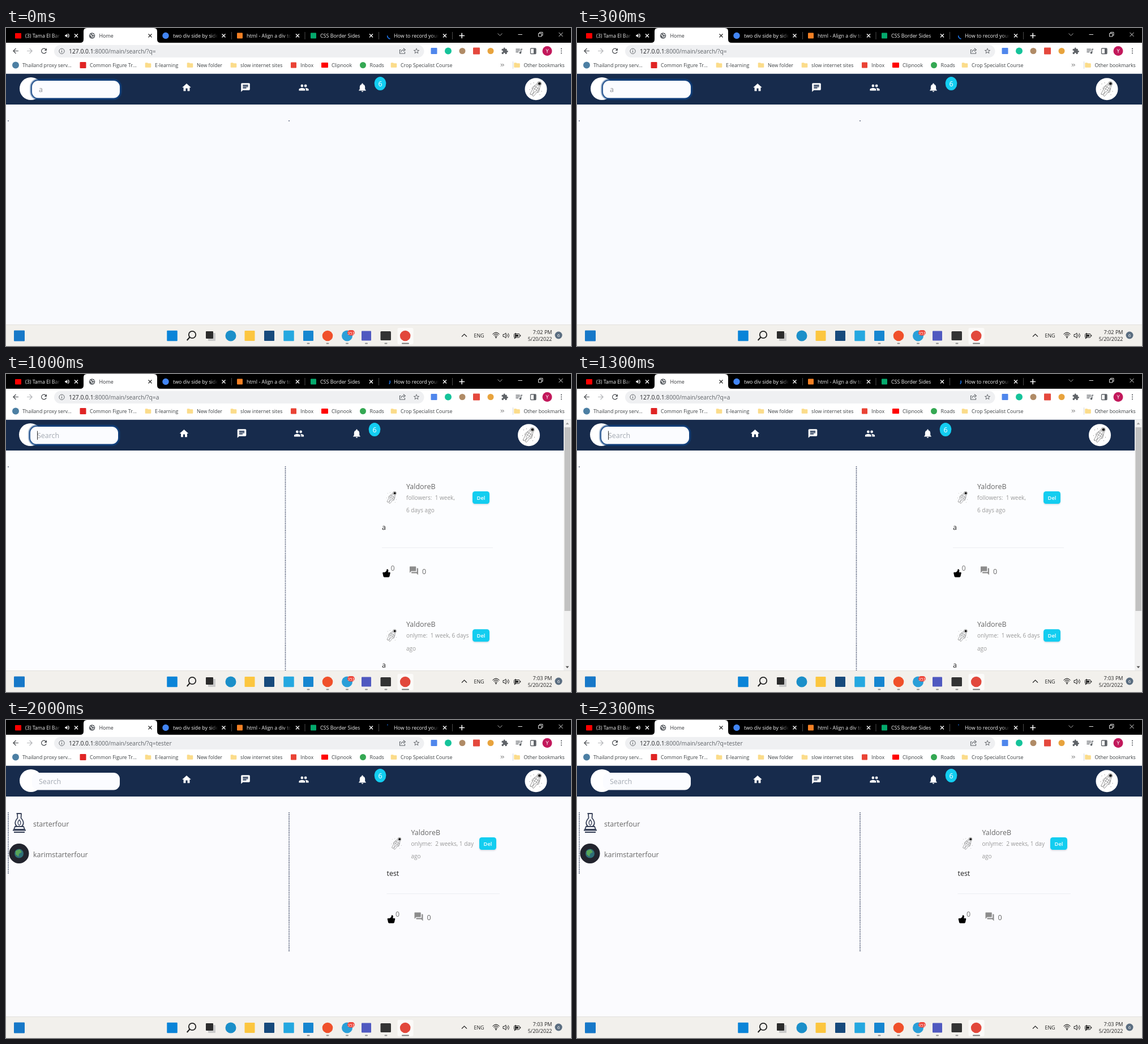
Animation of 998x561 px, one loop 2500 ms. Source, as an HTML page:

```html
<!DOCTYPE html>
<html lang="en">
<head>
<meta charset="utf-8">
<title>Search page</title>
<style>
html, body { margin: 0; width: 100%; height: 100%; overflow: hidden; background: #fff; }
svg { display: block; width: 998px; height: 561px; font-family: "Open Sans", "Noto Sans", sans-serif; }
text { white-space: pre; }
</style>
</head>
<body>
<svg id="stage" viewBox="0 0 998 561">
  <defs>
    <linearGradient id="fade"><stop offset="0" stop-opacity="0"/><stop offset="1"/></linearGradient>
    <clipPath id="view"><rect y="80" width="998" height="444"/></clipPath>
    <filter id="soft" x="-20%" y="-30%" width="140%" height="170%"><feGaussianBlur stdDeviation="1.2"/></filter>
  </defs>
  <g id="page" clip-path="url(#view)"></g>
  <g id="chrome"></g>
  <g id="live"></g>
</svg>
<script>
const LOOP = 2500, STEP = 500;
const NAVY = '#172b4c', CYAN = '#13cdf0';

const ICON = {
  home: 'M10 20v-6h4v6h5v-8h3L12 3 2 12h3v8z',
  chat: 'M20 2H4a2 2 0 0 0-2 2v18l4-4h14a2 2 0 0 0 2-2V4a2 2 0 0 0-2-2zM6 9h12v2H6zM6 12h8v2H6zM6 6h12v2H6z',
  people: 'M16 11a3 3 0 1 0 0-6 3 3 0 0 0 0 6zM8 11a3 3 0 1 0 0-6 3 3 0 0 0 0 6zm0 2c-2.3 0-7 1.2-7 3.5V19h14v-2.5c0-2.3-4.7-3.5-7-3.5zm8 0l-1 .1c1.2.8 2 2 2 3.4V19h6v-2.5c0-2.3-4.7-3.5-7-3.5z',
  bell: 'M12 22a2 2 0 0 0 2-2h-4a2 2 0 0 0 2 2zm6-6v-5c0-3-1.6-5.6-4.5-6.3V4a1.5 1.5 0 0 0-3 0v.7C7.6 5.4 6 8 6 11v5l-2 2v1h16v-1z',
  forum: 'M21 6h-2v9H6v2a1 1 0 0 0 1 1h11l4 4V7a1 1 0 0 0-1-1zm-4 6V3a1 1 0 0 0-1-1H3a1 1 0 0 0-1 1v14l4-4h10a1 1 0 0 0 1-1z',
  star: 'M22 9.2l-7.2-.6L12 2 9.2 8.6 2 9.2 7.5 14 5.8 21l6.2-3.7L18.2 21l-1.6-7zM12 15.4l-3.8 2.3 1-4.3-3.3-2.9 4.4-.4L12 6.1l1.7 4 4.4.4-3.3 2.9 1 4.3z',
  puzzle: 'M20.5 11H19V7a2 2 0 0 0-2-2h-4V3.5a2.5 2.5 0 0 0-5 0V5H4a2 2 0 0 0-2 2v3.8h1.5a2.7 2.7 0 0 1 0 5.4H2V20a2 2 0 0 0 2 2h3.8v-1.5a2.7 2.7 0 0 1 5.4 0V22H17a2 2 0 0 0 2-2v-4h1.5a2.5 2.5 0 0 0 0-5z',
  queue: 'M15 6H3v2h12zM15 10H3v2h12zM3 16h8v-2H3zM17 6v8.2a3 3 0 1 0 2 2.8V8h3V6z',
  reload: 'M17.6 6.4A8 8 0 1 0 19.7 14h-2.1A6 6 0 1 1 16.2 7.8L13 11h7V4z',
  back: 'M20 11H7.8l5.6-5.6L12 4l-8 8 8 8 1.4-1.4L7.8 13H20z',
  sound: 'M3 9v6h4l5 5V4L7 9zM16.5 12A4.5 4.5 0 0 0 14 8v8a4.5 4.5 0 0 0 2.5-4zM14 3.2v2.1a7 7 0 0 1 0 13.4v2.1a9 9 0 0 0 0-17.6z',
  folder: 'M10 4H4a2 2 0 0 0-2 2v12a2 2 0 0 0 2 2h16a2 2 0 0 0 2-2V8a2 2 0 0 0-2-2h-8z',
  thumb: 'M2 12q0-2 2-2h4q4.500-2 5-8 3.500-.5 4 3 0 3-1 5h4q2 0 2 2l-2 9q-.5 2-2.500 2h-11q-2 0-2.500-2z'
};

const $ = id => document.getElementById(id);
const text = (x, y, s, size, fill, more = '') =>
  `<text x="${x}" y="${y}" font-size="${size}" fill="${fill}" ${more}>${s}</text>`;
const rect = (x, y, w, h, fill, r = 0, more = '') =>
  `<rect x="${x}" y="${y}" width="${w}" height="${h}" rx="${r}" fill="${fill}" ${more}/>`;
const disc = (x, y, r, fill, more = '') =>
  `<circle cx="${x}" cy="${y}" r="${r}" fill="${fill}" ${more}/>`;
const square = (x, y, size, fill) => rect(x - size / 2, y - size / 2, size, size, fill, 1);
const line = (d, stroke, w = 1, more = '') =>
  `<path d="${d}" fill="none" stroke="${stroke}" stroke-width="${w}" ${more}/>`;
const icon = (name, x, y, k, fill, turn = 0) =>
  `<path d="${ICON[name]}" fill="${fill}" fill-rule="evenodd" transform="translate(${x} ${y}) rotate(${turn}) scale(${k}) translate(-12 -12)"/>`;
const cross = (x, y, r, c, w = 1.3) =>
  line(`M${x - r} ${y - r}l${2 * r} ${2 * r}m0 ${-2 * r}l${-2 * r} ${2 * r}`, c, w);
const dots = (x, y1, y2) =>
  line(`M${x} ${y1}V${y2}`, '#3b4663', 1.6, 'stroke-dasharray="1.56 1.56"');

function globe(x, y) {
  return disc(x, y, 5.3, '#5f6368') +
    line(`M${x - 4} ${y - 2}l3 2 1 3M${x} ${y - 4}l1 2 3 .5M${x + 1} ${y + 3}l2.5-2`, '#fff', 1.3);
}

function tabs() {
  const list = [
    [34, 97, '(3) Tama El Bar', 124], [295, 374, 'two div side by side', 384.5],
    [425, 504, 'html - Align a div to', 515], [555, 640, 'CSS Border Sides', 645],
    [685, 764, 'How to record your', 775]
  ];
  let s = rect(0, 0, 998, 26, '#000') +
    '<path d="M131 26q6 0 6-6V6q0-6 6-6h118q6 0 6 6v14q0 6 6 6z" fill="#fff"/>';
  for (const [x, end, name, shut] of list)
    s += text(x, 17, name, 8.9, '#f2f2f2') + rect(end - 14, 4, 14, 19, 'url(#fade)') +
      rect(end, 4, 6, 19, '#000') + cross(shut, 13.5, 3, '#fff');
  for (const x of [398, 527.5, 658, 788]) s += rect(x, 7, 1, 13, '#4a4a4a');
  s += rect(16, 9, 11, 9.5, '#f00', 1) + icon('sound', 108, 13.5, .42, '#fff') +
    globe(152, 13.5) + text(164.5, 17, 'Home', 8.9, '#303236') + cross(254.5, 13.5, 3, '#333') +
    disc(282, 13.5, 5.7, '#4285f4') + square(413, 13.5, 10, '#f48024') + square(543, 13.5, 10, '#04aa6d');
  s += line('M800.5 13.5h9.5M805.25 8.7v9.5', '#fff', 1.5) +
    line('M868.5 9.5l4 4 4-4', '#aaa') + line('M904.5 11.5h7.5', '#ddd') +
    line('M940.5 9.5h5.5v5.5h-5.5zM942.5 9.5v-2h5.5v5.5h-2', '#ddd') + cross(980, 11.5, 3.5, '#ddd', 1);
  return s;
}

function toolbar() {
  const grey = '#5f6368';
  return rect(0, 26, 998, 54.5, '#fff') + rect(85, 30, 653.5, 22, '#eff0f2', 11) +
    icon('back', 17, 40.5, .62, '#4a4d51') + icon('back', 42, 40.5, .62, '#b5b7ba', 180) +
    icon('reload', 67, 40.5, .62, '#4a4d51') +
    disc(98.5, 40.8, 4.6, 'none', `stroke="${grey}"`) + line('M98.5 40v3.3M98.5 37.9v1.2', grey, 1.1) +
    line('M697.5 38.5h-2v6.5h9v-3M697.8 42.5q.7-4 5-4M701.8 35.8l3.5 2.7-3.5 2.7', grey, 1.1) +
    icon('star', 725, 40.5, .54, grey) +
    square(756, 40.5, 11, '#4f86ec') + disc(781, 40.5, 6, '#15c39a') + disc(806, 40.5, 5.5, '#b08b66') +
    square(831, 40.5, 12, '#e5483d') + disc(856, 40.5, 5.5, '#e8a33d') +
    icon('puzzle', 881, 40.5, .54, grey) + icon('queue', 906, 40.5, .62, grey) +
    rect(926.5, 36, 9.5, 9.5, 'none', 1, `stroke="${grey}" stroke-width="1.3"`) + rect(932, 36, 4, 9.5, grey) +
    disc(956, 40.5, 8.5, '#c2185b') + text(956, 44, 'Y', 9, '#fff', 'text-anchor="middle"') +
    [36.7, 40.5, 44.3].map(y => disc(981, y, 1.1, grey)).join('');
}

function bookmarks() {
  const list = [
    [29, 'Thailand proxy serv...', disc(17, 65.5, 6, '#4c7fa3')],
    [148, 'Common Figure Tr...', square(136, 65.5, 11, '#e02424')],
    [263, 'E-learning'], [337, 'New folder'], [414, 'slow internet sites'],
    [520, 'Inbox', square(508, 65.5, 10, '#ea4335')],
    [575, 'Clipnook', rect(557, 61, 12, 9, '#f00', 1)],
    [642.5, 'Roads', disc(630.5, 65.5, 5.5, '#34a853')],
    [697, 'Crop Specialist Course'], [914.5, 'Other bookmarks']
  ];
  return list.map(([x, name, mark]) =>
    (mark || icon('folder', x - 12, 65.5, .53, '#fbdc8a')) + text(x, 69, name, 8.8, '#3c4043')).join('') +
    line('M874 63l2.3 2.3-2.3 2.3M877 63l2.3 2.3-2.3 2.3', '#555') + rect(895, 59, 1, 13, '#d5d7da');
}

function taskbar() {
  const ink = '#222';
  let s = rect(0, 523.5, 998, 38, '#f2f0ec') + rect(0, 523, 998, 1, '#e3e1dd') +
    rect(691.5, 529, 28, 29, '#fbfaf8', 3);
  s += square(23.5, 543, 19, '#1778c8') + square(293.5, 543, 18.5, '#0a84d8') +
    disc(329, 541, 6.2, 'none', 'stroke="#222" stroke-width="1.8"') + line('M324.5 545.5l-4.8 5.5', ink, 2) +
    rect(357, 538, 13, 14, '#c9c9c9', 1) + rect(353, 535, 13, 13, '#2b2b2b', 1) +
    disc(397, 543, 9.5, '#1b8fc9') + square(430.5, 543, 18, '#fcc63f') + square(465, 543, 18, '#174a7c') +
    square(499.5, 543, 18.5, '#25a8e0') + square(534, 543, 18, '#1686d0') + disc(568, 543, 9.3, '#f0502a') +
    disc(602.5, 543, 9.5, '#2a9fd8') + square(636.5, 543, 17, '#5059c0') +
    rect(661.5, 535, 18.5, 16, '#333', 1.5) + disc(705.2, 543, 9.3, '#e2483c');
  s += rect(603, 533, 13, 9.5, '#ee4136', 4.7) +
    text(609.5, 540.6, '353', 7, '#fff', 'text-anchor="middle"');
  for (const x of [534, 568, 602.5, 636.5, 671]) s += rect(x - 2.5, 555.5, 5, 2, '#8b8b8b', 1);
  s += rect(699, 555.5, 13, 2, '#777', 1);
  s += line('M805 544.5l4.5-4.5 4.5 4.5', ink, 1.1) + text(826.5, 546, 'ENG', 8.8, ink);
  s += [6, 4, 2].map(r => line(`M${865.5 - r} ${546.5 - r}Q865.5 ${544.5 - 1.8 * r} ${865.5 + r} ${546.5 - r}`, ink, 1.1)).join('') +
    disc(865.5, 546, 1.2, ink) +
    line('M878 540.5h2l3-2.5v9l-3-2.5h-2zM885 540.5q1.5 2 0 4M887 538.5q3 4 0 8', ink) +
    rect(897.5, 539.5, 9.5, 6.5, 'none', 1, `stroke="${ink}"`) + rect(899, 541, 6, 3.5, ink) +
    rect(908, 541.5, 1.2, 2.5, ink) + line('M900 538v8l-2 2', ink, 1.5) +
    disc(976, 542, 6.5, '#5a6d80') + text(976, 545, '6', 8, '#fff', 'text-anchor="middle"');
  return s;
}

// Floating figure sketch used as the profile picture
function sketch(x, y, k) {
  const specks = [[-9, -9], [-11, 1], [-4, -11], [10, 4], [7, 10], [-9, 9]];
  return `<g transform="translate(${x} ${y}) scale(${k})">` +
    specks.map(([a, b]) => disc(a, b, .6, '#888')).join('') +
    '<g transform="rotate(33)" fill="none" stroke="#888" stroke-width=".8">' +
    '<path d="M-4-8q4-3 8 0l1 9-1.5 12h-2.5l-1-8-1 8h-3l-1-12zM-4-3h8M-4 1h8M-2-7v13M2-7v13M-5-5l-2 7 2 2M5-5l2 7-2 2"/></g>' +
    disc(6, -9.5, 3.7, '#fff', 'stroke="#666" stroke-width=".7"') + disc(6.3, -9.5, 2.4, '#111') + '</g>';
}

function navbar(wide, box) {
  const at = wide ? [319, 423, 526, 629.5, 661, 936] : [314.5, 416.5, 517.5, 619.5, 651, 923.5];
  const x = wide ? 46 : 43;
  const [word, focus, caret, faint] = box;
  let s = rect(0, 80.5, 998, 54.5, NAVY) + disc(wide ? 44 : 43, 107, 20, '#fff');
  if (focus) s += rect(x - 1, 92, 157, 32.5, 'none', 12, 'stroke="#0d4384" stroke-width="3.5" filter="url(#soft)"');
  s += rect(x, 93, 155, 30.5, '#fbfcff', 11) + text(x + 12, 112.5, word, 12.475, faint ? '#a3a9b1' : '#8b8f96');
  if (caret) s += rect(55, 100.5, 1, 15.5, '#333');
  ['home', 'chat', 'people', 'bell'].forEach((n, i) => s += icon(n, at[i], 105, .78, '#fff'));
  s += `<ellipse cx="${at[4]}" cy="98" rx="10.3" ry="12" fill="${CYAN}"/>` +
    text(at[4], 102.5, '6', 12.4, '#fff', 'text-anchor="middle"');
  return s + disc(at[5], 107.7, 19.5, '#fff') + sketch(at[5], 107.7, 1);
}

function post(wide, top, lines, body) {
  const x = wide ? 8.5 : 0, bx = wide ? 836 : 824;
  return sketch(681.5 + x, top + 218, .82) +
    text(707 + x, top + 202.5, 'YaldoreB', 12.475, '#666') +
    lines.map((s, i) => text(707 + x, top + 222 + 22.4 * i, s, 10.05, '#999')).join('') +
    rect(bx, top + 209, 30, 21.5, '#9aa7b8', 4.5, 'filter="url(#soft)" opacity=".4"') +
    rect(bx, top + 207, 30, 22, CYAN, 4.5) +
    text(bx + 15, top + 221.5, 'Del', 9.4, '#fff', 'text-anchor="middle" font-weight="600"') +
    text(664 + x, top + 275, body, 12.475, '#222') +
    rect(664 + x, top + 306, wide ? 199.5 : 196, 1, '#eceef2') +
    icon('thumb', 672 + x, top + 351, .68, '#000') + text(679.5 + x, top + 347, '0', 12.475, '#777') +
    icon('forum', 720.5 + x, top + 347, .75, '#8c8c8c') + text(735 + x, top + 352.5, '0', 12.475, '#666');
}

function scrollbar() {
  return rect(985, 80.5, 13, 443, '#f1f1f1') + rect(986.5, 94, 10.5, 324, '#c1c1c1') +
    '<path d="M988.5 89l3-3.5 3 3.5z" fill="#a0a0a0"/><path d="M988.5 515.5l3 3.5 3-3.5z" fill="#505050"/>';
}

function results() {
  return dots(4, 163, 272) + dots(500, 163, 408) +
    line('M18.5 165h9M20 165l.5 8q-8 9-1 15h8q7-6-1-15l.5-8M16 188h15l2 5H14zM12 194.5h23M14 198h19', '#39425a', 1.8) +
    line('M23.5 186q-5-4 0-10 5 6 0 10', '#39425a', 1.3) + text(48, 188, 'starterfour', 12.475, '#666') +
    disc(23, 235.5, 17.5, '#22242e') + disc(23, 235.5, 8, '#2f6f78') +
    '<path d="M17 231l7-3 4 5-5 3-1 5-5-4z" fill="#58a558"/>' + text(48, 241.5, 'karimstarterfour', 12.475, '#666') +
    post(true, 0, ['onlyme:  2 weeks, 1 day', 'ago'], 'test');
}

function feed() {
  return dots(4, 163, 164.5) + dots(493.5, 163, 524) +
    post(false, 0, ['followers:  1 week,', '6 days ago'], 'a') +
    post(false, 243.3, ['onlyme:  1 week, 6 days', 'ago'], 'a') + scrollbar();
}

const blank = () => dots(4, 163, 164.5) + dots(500, 163, 164.5);

// box: word, focus, caret, placeholder; spin: centre x, start and end angle
const SCENES = [
  { wide: 1, bg: '#f9fafe', box: ['a', 1, 0, 0], body: blank, query: '', time: '7:02 PM', spin: [679, 95, 185] },
  { wide: 0, bg: '#fcfdff', box: ['Search', 0, 0, 1], body: feed, query: 'a', time: '7:03 PM', spin: [673, 70, 285] },
  { wide: 0, bg: '#fcfdff', box: ['Search', 1, 1, 1], body: feed, query: 'a', time: '7:03 PM', spin: [673, -25, 45] },
  { wide: 0, bg: '#fcfdff', box: ['tester', 1, 0, 0], body: feed, query: 'a', time: '7:03 PM', spin: [673, 172, 188] },
  { wide: 1, bg: '#fbfbfe', box: ['Search', 0, 0, 1], body: results, query: 'tester', time: '7:03 PM', spin: [673, 272, 288] }
];

function spinner([cx, from, to]) {
  const p = a => [cx + 5.3 * Math.cos(a * Math.PI / 180), 13.8 + 5.3 * Math.sin(a * Math.PI / 180)].join(' ');
  return line(`M${p(from)}A5.3 5.3 0 ${to - from > 180 ? 1 : 0} 1 ${p(to)}`, '#1a73e8', 1.7);
}

function draw(s) {
  $('page').innerHTML = rect(0, 80, 998, 445, s.bg) + navbar(s.wide, s.box) + s.body();
  $('live').innerHTML = spinner(s.spin) +
    text(111, 44.5, `127.0.0.1<tspan fill="#5f6368">:8000/main/search/?q=${s.query}</tspan>`, 10.3, '#202124') +
    text(964.5, 540, s.time, 9.05, '#222', 'text-anchor="end"') +
    text(964.5, 551.7, '5/20/2022', 9.05, '#222', 'text-anchor="end"');
}

$('chrome').innerHTML = tabs() + toolbar() + bookmarks() + taskbar();

let shown = -1;
function tick(now) {
  const i = Math.floor(now % LOOP / STEP);
  if (i !== shown) draw(SCENES[shown = i]);
  requestAnimationFrame(tick);
}
tick(performance.now());
</script>
</body>
</html>
```
